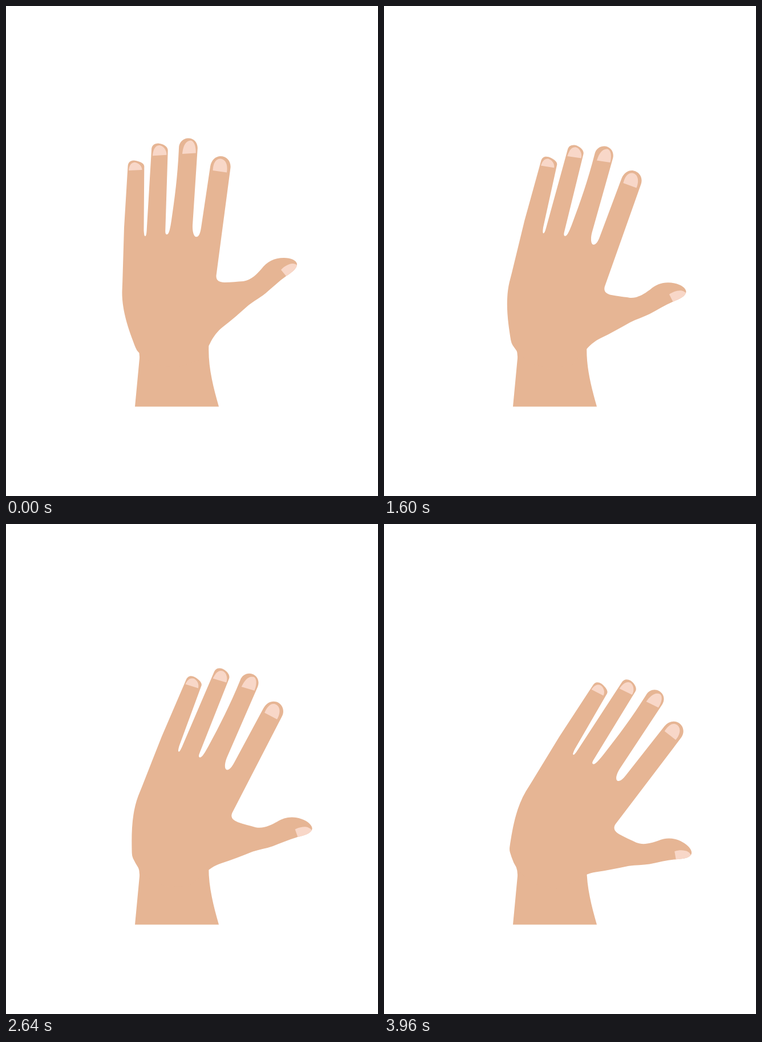
Write an HTML page that moves like this. It is 652x858 px and loops after 4 s.

```html
<!DOCTYPE html>
<html lang="en">
<head>
<meta charset="utf-8">
<title>Waving hand</title>
<style>
  html, body { margin: 0; height: 100%; overflow: hidden; background: #fff; }
  svg { display: block; width: 100%; height: 100%; }
  .skin { fill: #e6b594; }
  .nail { fill: #f8d7c8; }
</style>
</head>
<body>
<svg viewBox="0 0 652 858">
  <path class="skin" d="M226 701.5 L234 617 Q234.5 608 231.5 600 L250 585 L340 580 L355.5 592
    C353.5 630 363 666 373 701.5 Z"/>
  <g id="hand">
    <!-- Outline: palm edge, four fingers, thumb, heel -->
    <path class="skin" d="M227 598 C217 572 203 536 203.5 500 L204.2 482 L207 388 L213.5 281
      C214 273 218 270.5 225 270.5 C233 271.5 242.5 275 242.3 281
      L241.5 393 C242 400 242.5 403 244 403 C245.5 403 246.3 400 246.8 390
      L255 252 C255 244 260 240.7 267 240.5 C275 241 284 246 283.7 253
      L279.3 392 C279 398 280 400 282 400 C286 400 288 388 290 375 C296 335 301 296 303 249
      C303 238 311 231.5 319.5 231.5 C329 231.5 336 239 335.8 249
      L327 384 C326.5 397 330 404.3 333.5 404.3 C338 404.3 340.5 398 342 388
      L358 281 C360 269 368 263 376 263 C386 263 394.5 271 393.5 283
      L368.5 472 C368 481 374 483.8 383 484 C395 484 405 482.5 416 482
      C430 480 440 469 448 460 C457 448 470 441 487 441
      C500 441 510.5 446 510 453 C509 460 503 465 491 473
      C478 482 467 493 455 503 C445 511 435 516 425 524
      C410 537 396 550 380 562 C371 569 363 579 357 592
      L340 620 L300 633 L275 631 Q257 626 247 619 Q238 612 232 606 Q229 603 227 598 Z"/>
    <g class="nail">
      <path d="M215 288 C216 278 220 274 226 273.7 C233 275 238 280 238.5 287 Z"/>
      <path d="M257 262.3 C258 250 262 244.2 269 244 C276 245 281.5 252 281.5 260.7 Z"/>
      <path d="M309 259 C310 247 314 235.7 324 235.5 C330 237 333 246 332.7 257.5 Z"/>
      <path d="M362.5 288 C363 276 367 268 375 267.5 C384 267.5 389.5 277 387 291.5 Z"/>
      <path d="M482 462 C488 455 497 451 502 451 C506 451 509 452.5 510 453.5 C509 460 503 465 491 473 Z"/>
    </g>
  </g>
</svg>
<script>
  const LOOP = 4000, STEP = 40, SWING = 30;
  const hand = document.getElementById('hand');

  function draw() {
    const time = Math.floor(performance.now() % LOOP / STEP) * STEP;
    hand.setAttribute('transform', `rotate(${SWING * time / LOOP} 286 569)`);
    requestAnimationFrame(draw);
  }
  draw();
</script>
</body>
</html>
```
